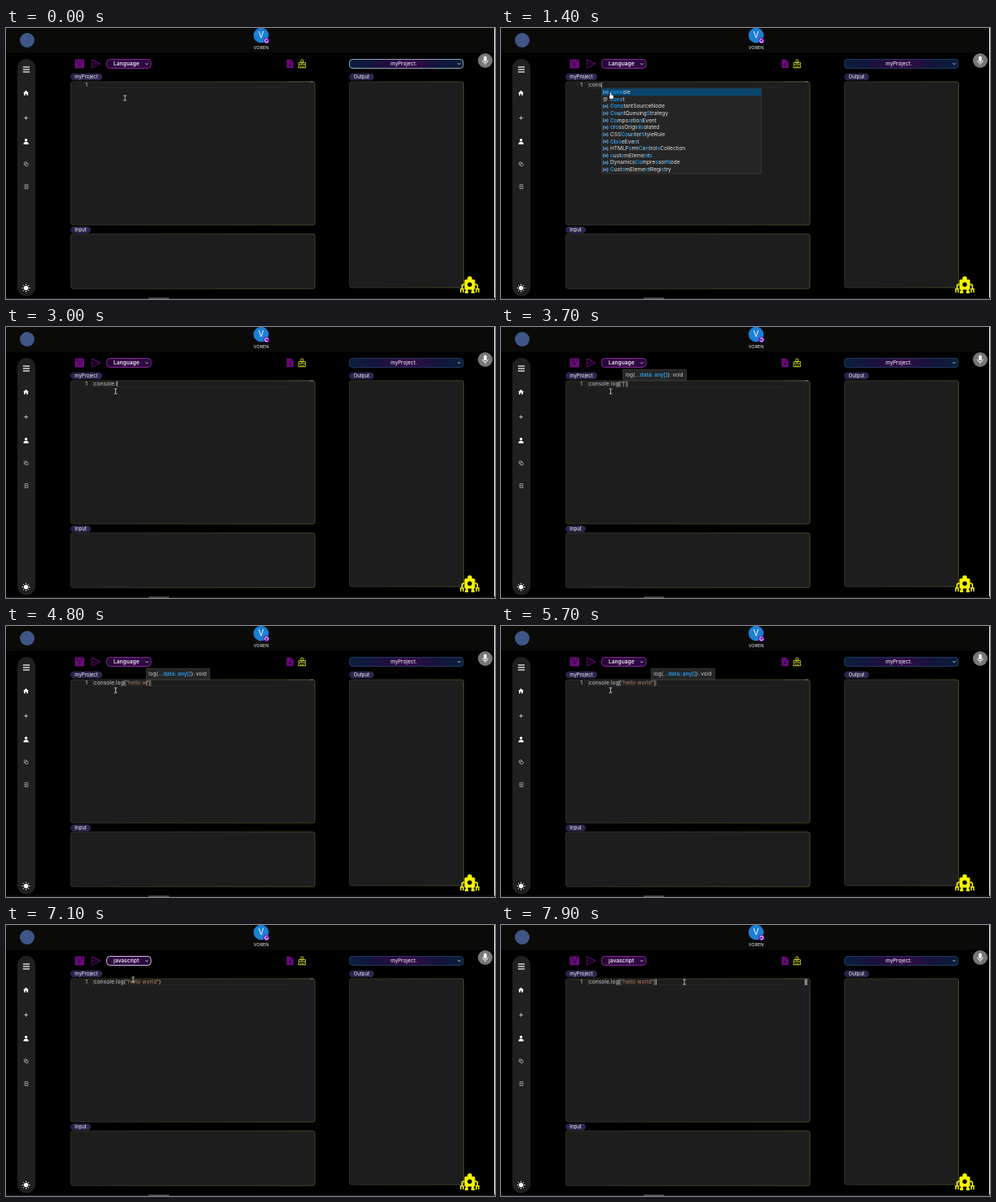
These frames come from a looping animation (600 px wide and 333 px high, 8000 ms). An HTML page with a canvas:

```html
<!DOCTYPE html>
<html lang="en">
<head>
<meta charset="utf-8">
<title>Code editor</title>
<style>
html, body { margin: 0; width: 100%; height: 100%; overflow: hidden; background: #000; }
canvas { display: block; width: 600px; height: 333px; }
</style>
</head>
<body>
<canvas id="stage"></canvas>
<script>
const W = 600, H = 333, LOOP = 8000;
const canvas = document.getElementById('stage');
const ctx = canvas.getContext('2d');
const dpr = window.devicePixelRatio || 1;
canvas.width = W * dpr;
canvas.height = H * dpr;

const FONT = 'Inter, "Open Sans", sans-serif';
const CODE_X = 108, CODE_Y = 70, CODE_SIZE = 6.7;
const PURPLE = '#6c0a7c', YELLOW = '#f5f500', LIGHT = '#d8d8d8';

const suggestions = ['console', 'const', 'ConstantSourceNode', 'CountQueuingStrategy',
  'CompositionEvent', 'crossOriginIsolated', 'CSSCounterStyleRule', 'CloseEvent',
  'HTMLFormControlsCollection', 'customElements', 'DynamicsCompressorNode',
  'CustomElementRegistry'];

// ---- drawing helpers ----
function rect(x, y, w, h, fill) {
  ctx.fillStyle = fill;
  ctx.fillRect(x, y, w, h);
}

function box(x, y, w, h, r, fill, stroke, lw = 0.8) {
  ctx.beginPath();
  ctx.roundRect(x, y, w, h, r);
  if (fill) { ctx.fillStyle = fill; ctx.fill(); }
  if (stroke) { ctx.strokeStyle = stroke; ctx.lineWidth = lw; ctx.stroke(); }
}

function disc(x, y, r, fill) {
  ctx.beginPath();
  ctx.arc(x, y, r, 0, Math.PI * 2);
  ctx.fillStyle = fill;
  ctx.fill();
}

function line(points, color, lw = 1) {
  ctx.beginPath();
  points.forEach(([x, y], i) => i ? ctx.lineTo(x, y) : ctx.moveTo(x, y));
  ctx.strokeStyle = color;
  ctx.lineWidth = lw;
  ctx.stroke();
}

function poly(points, fill) {
  ctx.beginPath();
  points.forEach(([x, y]) => ctx.lineTo(x, y));
  ctx.closePath();
  ctx.fillStyle = fill;
  ctx.fill();
}

function setFont(size, weight = 400) {
  ctx.font = `${weight} ${size}px ${FONT}`;
}

function text(str, x, y, size, color, align = 'left', weight = 400) {
  setFont(size, weight);
  ctx.textAlign = align;
  ctx.textBaseline = 'middle';
  ctx.fillStyle = color;
  ctx.fillText(str, x, y);
  return ctx.measureText(str).width;
}

function gradient(x0, x1, ...colors) {
  const g = ctx.createLinearGradient(x0, 0, x1, 0);
  colors.forEach((c, i) => g.addColorStop(i / (colors.length - 1), c));
  return g;
}

function chevron(x, y) {
  line([[x - 1.6, y - 0.8], [x, y + 0.8], [x + 1.6, y - 0.8]], '#ddd', 0.9);
}

// ---- state ----
const keys = [[1000, 'c'], [1100, 'co'], [1200, 'con'], [1300, 'cons'], [2000, 'console'],
  [2800, 'console.'], [3000, 'console.l'], [3100, 'console.lo'], [3250, 'console.log'],
  [3450, 'console.log('], [3600, 'console.log("']];
const GREETING = 'hello world';

function typedAt(t) {
  let s = '';
  for (const [at, str] of keys) if (t >= at) s = str;
  if (t >= 3900) s += GREETING.slice(0, 1 + Math.floor((t - 3900) / 150));
  return s;
}

function closingAt(t) {
  return t >= 3600 ? '")' : t >= 3450 ? ')' : '';
}

const path = [[0, 146, 86], [250, 146, 86], [700, 134.5, 79], [5800, 134.5, 79],
  [6250, 155, 45], [6900, 155, 46], [7100, 156, 67], [7450, 225, 70], [8000, 225, 70]];

function mouseAt(t) {
  const i = Math.max(1, path.findIndex(p => p[0] > t));
  const [t0, x0, y0] = path[i - 1], [t1, x1, y1] = path[i];
  const k = (t - t0) / (t1 - t0), e = k * k * (3 - 2 * k);
  return [x0 + (x1 - x0) * e, y0 + (y1 - y0) * e];
}

// ---- page parts ----
function drawHeader(t) {
  rect(0, 0, W, 30.5, '#0a0b09');
  disc(26, 15, 9, '#3f5686');
  disc(313, 9, 9.3, '#1d7fd4');
  text('V', 313, 9.2, 10, '#fff', 'center');
  disc(319.6, 15.6, 3.6, '#6a16ad');
  const a = t / 1000 * Math.PI * 1.4;
  ctx.beginPath();
  ctx.arc(319.6, 15.6, 2, a, a + 5.3);
  ctx.strokeStyle = '#fff';
  ctx.lineWidth = 1;
  ctx.stroke();
  text('VOREN', 313, 24.3, 5.4, '#eee', 'center');
}

function drawSidebar() {
  box(14, 38, 22, 291.5, 11, '#202020');
  for (const y of [48, 51, 54]) rect(20.8, y - 0.6, 8.2, 1.2, '#fff');
  poly([[24.5, 76.8], [28, 80], [27, 80], [27, 82.8], [25.3, 82.8], [25.3, 80.7],
    [23.7, 80.7], [23.7, 82.8], [22, 82.8], [22, 80], [21, 80]], '#fff');
  line([[22.2, 110.5], [27, 110.5]], LIGHT, 0.8);
  line([[24.6, 108.1], [24.6, 112.9]], LIGHT, 0.8);
  disc(24.6, 137.8, 1.7, '#fff');
  box(21.5, 139.9, 6.2, 3, [2.4, 2.4, 0, 0], '#fff');
  box(22.3, 164.9, 3.2, 3.2, 0.5, null, LIGHT, 0.6);
  box(23.8, 166.3, 3.2, 3.2, 0.5, '#202020', LIGHT, 0.6);
  line([[23, 193.8], [23, 192.6], [26.8, 192.6], [26.8, 197.5], [23, 197.5], [23, 196.4]], LIGHT, 0.6);
  line([[21.8, 195.1], [25.3, 195.1]], LIGHT, 0.6);
  line([[24.3, 194.1], [25.3, 195.1], [24.3, 196.1]], LIGHT, 0.6);
  disc(24.6, 319.5, 2.7, '#fff');
  for (let i = 0; i < 8; i++) {
    const c = Math.cos(i * Math.PI / 4), s = Math.sin(i * Math.PI / 4);
    line([[24.6 + c * 3.5, 319.5 + s * 3.5], [24.6 + c * 4.9, 319.5 + s * 4.9]], '#fff', 1);
  }
}

function drawToolbar(t) {
  box(84.5, 38.5, 11.5, 11, 1.2, PURPLE);
  rect(87, 39.5, 1, 3.4, '#2a0532');
  rect(92.6, 39.5, 1, 3.4, '#2a0532');
  line([[90.3, 41.5], [90.3, 46.5]], '#2a0532', 1);
  line([[87.8, 44.5], [90.3, 46.8], [92.8, 44.5]], '#2a0532', 1);
  ctx.lineJoin = 'round';
  line([[105.3, 39], [115.7, 44], [105.3, 49.2], [105.3, 39], [115.7, 44]], PURPLE, 0.9);
  line([[105.5, 44], [111, 44]], PURPLE, 0.8);
  ctx.lineJoin = 'miter';

  const focused = t >= 6350 && t < 7550;
  box(123.5, 38.5, 54.5, 11, 4, gradient(123, 178, '#240532', '#3c0c50', '#26073a'),
    focused ? '#e0d4e6' : '#8e2a9c', 0.9);
  text(t < 6800 ? 'Language' : 'javascript', 132, 44.2, 6.7, '#fff', 'left', 500);
  chevron(172.8, 44.2);

  poly([[344.4, 38.7], [350, 38.7], [352.8, 41.5], [352.8, 49.2], [344.4, 49.2]], PURPLE);
  line([[350, 39], [350, 41.7], [352.7, 41.7]], '#2b0633', 0.7);
  line([[348.6, 42.8], [348.6, 46.8]], '#22042a', 0.9);
  line([[346.8, 45.2], [348.6, 47], [350.4, 45.2]], '#22042a', 0.9);

  const lime = '#d5df20';
  box(361.9, 39, 2.6, 4.2, 0.6, null, lime, 0.9);
  box(359, 42.5, 8.5, 2.4, 0.5, null, lime, 0.9);
  line([[359.5, 45], [358.8, 48.8], [367.7, 48.8], [367, 45]], lime, 0.9);
  for (const x of [361.6, 363.3, 365]) line([[x, 46.6], [x, 48.8]], lime, 0.7);

  box(421.5, 38.5, 139.5, 11, 3.5, gradient(421, 561, '#08203a', '#17113d', '#360b49', '#16123c', '#08203a'),
    t < 400 ? '#b4cbd8' : '#28466f', 0.8);
  text('myProject.', 488, 44.2, 6.4, '#fff', 'center');
  chevron(556, 44);
}

function tag(str, x, y, w) {
  box(x, y, w, 8.4, 4.2, gradient(x, x + w, '#252348', '#342650'));
  text(str, x + w / 2, y + 4.4, 6, '#f4f4f4', 'center');
}

function drawPanels() {
  tag('myProject', 79, 55.8, 39);
  tag('Input', 79, 243.9, 25);
  tag('Output', 421, 55.8, 30.5);
  for (const [x, y, w, h] of [[79.5, 66, 299.5, 176], [79.5, 253, 299.5, 67.3], [421.5, 66, 140, 253]]) {
    const edge = gradient(x, x + w, '#34362b', '#40432a', '#50542b');
    box(x, y, w, h, 2.5, '#1d1d1d', edge, 0.8);
  }
}

function drawRobot(cx) {
  box(cx - 2.7, 305.2, 5.4, 4.5, [2, 2, 0, 0], YELLOW);
  box(cx - 6.5, 309, 13, 12.5, 1.5, YELLOW);
  disc(cx, 315.3, 2.7, '#000');
  for (const s of [-1, 1]) {
    line([[cx + s * 6.5, 314.5], [cx + s * 9.4, 316], [cx + s * 9.4, 320]], YELLOW, 1.6);
    line([[cx + s * 8, 325], [cx + s * 8, 320.8], [cx + s * 11, 320.8], [cx + s * 11, 325]], YELLOW, 1.5);
    rect(cx + s * 3.6 - 1.3, 321, 2.6, 2.8, YELLOW);
    rect(cx + s * 3.9 - 2.1, 323.3, 4.2, 2.7, YELLOW);
  }
}

function drawExtras() {
  disc(588, 40, 9, '#777');
  box(586.2, 34.6, 3.6, 6.6, 1.8, '#fff');
  ctx.beginPath();
  ctx.arc(588, 39.6, 3.3, 0, Math.PI);
  ctx.strokeStyle = '#fff';
  ctx.lineWidth = 0.9;
  ctx.stroke();
  line([[588, 43], [588, 45.2]], '#fff', 0.9);
  drawRobot(569);
  rect(599, 0, 1, H, '#f0f0f0');
  rect(0, 331.4, W, 1.6, '#161616');
  rect(175, 331.4, 25, 1.6, '#555');
}

// ---- editor ----
function drawEditor(t) {
  const typed = typedAt(t), close = closingAt(t);
  const focused = (t >= 400 && t < 6350) || t >= 7550;
  rect(107, 73, 238, 0.7, '#2c2c2c');
  rect(347, 65.7, 30, 0.8, '#45472f');
  rect(371.8, 66.5, 0.6, 175, t >= 6350 ? '#25263b' : '#272727');
  if (t >= 7450) rect(372.5, 66.4, 3.4, 7.6, '#858585');
  else rect(373, 65.6, 4, 0.9, '#777');
  text('1', 98.5, CODE_Y, 6.7, '#d0d0d0', 'center');
  if (typed) rect(106.9, 67, 0.6, 6.5, '#666');

  const quote = typed.indexOf('"');
  const head = quote < 0 ? typed : typed.slice(0, quote);
  let x = CODE_X + text(head, CODE_X, CODE_Y, CODE_SIZE, '#d4d4d4');
  const openX = x;
  if (quote >= 0) x += text(typed.slice(quote), x, CODE_Y, CODE_SIZE, '#b98561');
  let caret = x;
  if (close.length === 2) x += text('"', x, CODE_Y, CODE_SIZE, '#b98561');
  if (close) {
    const w = text(')', x, CODE_Y, CODE_SIZE, '#d4d4d4');
    if (focused) {
      box(x, 66.8, w, 6.6, 0, null, '#777', 0.5);
      box(openX - w, 66.8, w, 6.6, 0, null, '#777', 0.5);
    }
    if (t >= 7550) caret = x + w;
  }
  const typing = typed && t < 5700;
  if (focused && (typing || t >= 7550 || t % 1000 < 500)) rect(caret, 66.8, 0.7, 6.7, '#bbb');
  return caret;
}

function drawHint(x) {
  const parts = [['log(', '#d0d0d0', 400], ['...data: any[]', '#2a9fea', 600], ['): void', '#d0d0d0', 400]];
  box(x - 0.5, 52.3, 78, 13.5, 0, '#252526', '#484848', 0.6);
  x += 2.5;
  for (const [s, color, weight] of parts) x += text(s, x, 59, 6.5, color, 'left', weight);
}

// indices of matched letters, allowing one swapped pair
function matches(word) {
  const lower = word.toLowerCase();
  const first = Math.max(0, word.lastIndexOf('Co'));
  for (const query of ['cons', 'cosn']) {
    const hits = [];
    let from = first;
    for (const ch of query) {
      const i = lower.indexOf(ch, from);
      if (i < 0) break;
      hits.push(i);
      from = i + 1;
    }
    if (hits.length === 4) return hits;
  }
  return [...'cons'].map(ch => lower.indexOf(ch));
}

function drawSuggestions() {
  box(123.5, 74.3, 196, 104.5, 0, '#252526', '#404040', 0.6);
  rect(124, 74.5, 195.3, 8.7, '#08466f');
  const blue = '#75beff';
  suggestions.forEach((word, row) => {
    const y = 79 + row * 8.65;
    if (row === 1) {
      box(126, y - 2, 4, 1.3, 0, null, '#ccc', 0.6);
      line([[125.7, y + 0.6], [130.8, y + 0.6]], '#ccc', 0.6);
      line([[125.7, y + 2.2], [129.5, y + 2.2]], '#ccc', 0.6);
    } else {
      line([[126.5, y - 2], [125.5, y - 2], [125.5, y + 2], [126.5, y + 2]], blue, 0.7);
      line([[130, y - 2], [131, y - 2], [131, y + 2], [130, y + 2]], blue, 0.7);
      box(127.1, y - 0.9, 2.3, 1.8, 0.3, null, blue, 0.8);
    }
    const hits = matches(word);
    let x = 134;
    [...word].forEach((ch, i) => {
      const hit = hits.includes(i);
      x += text(ch, x, y, 6.55, hit ? '#1c9df2' : '#e4e4e4', 'left', hit ? 600 : 400);
    });
  });
}

function drawMouse(t) {
  const [x, y] = mouseAt(t);
  const overList = t >= 1100 && t < 2000;
  if (overList) {
    box(x - 0.8, y, 1.7, 5, 0.8, '#fff', '#111', 0.5);
    box(x - 1.6, y + 3.2, 5.2, 5, 1.5, '#fff', '#111', 0.5);
    rect(x - 0.5, y + 1, 1.1, 4, '#fff');
  } else if (y < 52) {
    const arrow = [[x, y], [x, y + 7.5], [x + 1.8, y + 5.8], [x + 3, y + 8.2],
      [x + 4.1, y + 7.6], [x + 3, y + 5.3], [x + 5.3, y + 5.3]];
    poly(arrow, '#fff');
    line([...arrow, arrow[0]], '#111', 0.5);
  } else {
    line([[x, y - 2.8], [x, y + 2.8]], '#ddd', 0.8);
    for (const dy of [-3, 3]) line([[x - 1.8, y + dy], [x + 1.8, y + dy]], '#ddd', 0.8);
  }
}

function render(t) {
  ctx.setTransform(dpr, 0, 0, dpr, 0, 0);
  rect(0, 0, W, H, '#000');
  drawHeader(t);
  drawSidebar();
  drawToolbar(t);
  drawPanels();
  drawExtras();
  const caret = drawEditor(t);
  if (t >= 1100 && t < 2000) drawSuggestions();
  if (t >= 3450 && t < 6350) drawHint(caret);
  drawMouse(t);
}

const start = performance.now();
function tick() {
  render((performance.now() - start) % LOOP);
  requestAnimationFrame(tick);
}
tick();
</script>
</body>
</html>
```
